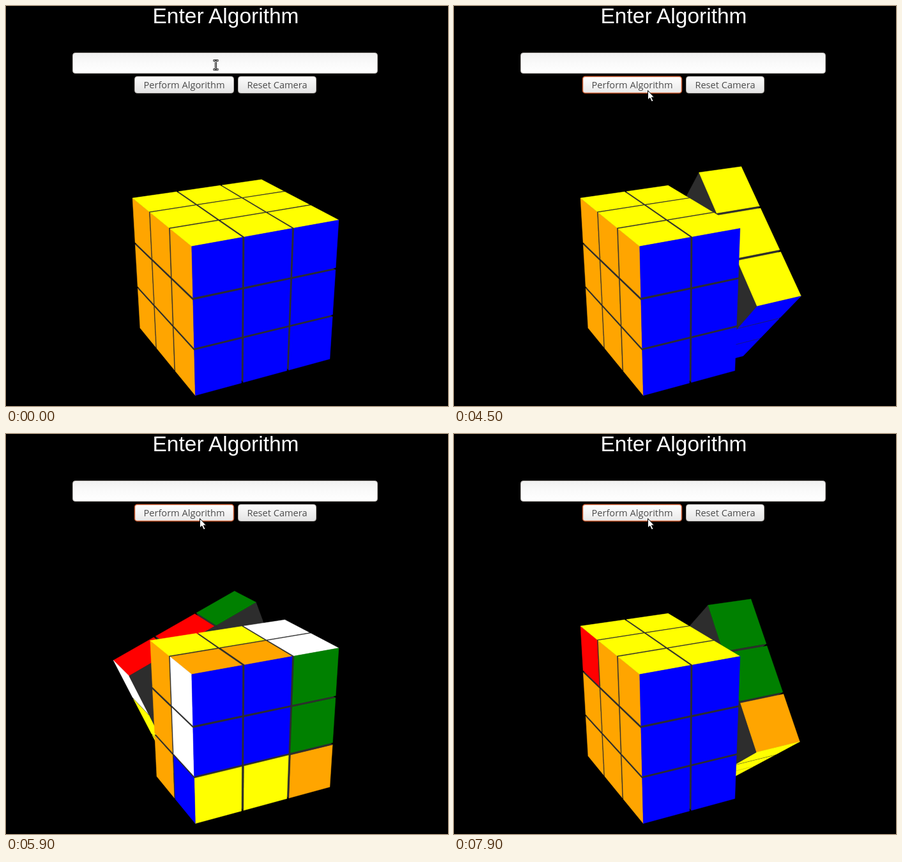
These frames come from a looping animation (692x627 px, 8000 ms). An HTML page with a canvas:

```html
<!DOCTYPE html>
<html lang="en">
<head>
<meta charset="utf-8">
<title>Enter Algorithm</title>
<style>
  html, body { margin: 0; width: 100%; height: 100%; overflow: hidden; background: #000; }
  canvas, svg { position: absolute; left: 0; top: 0; width: 692px; height: 627px; }
  .title { font: 33.5px "Liberation Sans", Arial, sans-serif; fill: #fff; text-anchor: middle; }
  .label { font: 14.6px "Open Sans", "Noto Sans", sans-serif; fill: #4c4c4c; text-anchor: middle; }
  .entry { font: 19.7px "Open Sans", "Noto Sans", sans-serif; fill: #3c3c3c; }
  .box { stroke: #b4b0ac; }
  .box.focus { stroke: #e0875f; }
  .button.focus { stroke: #c8582c; stroke-width: 1.5; }
  .button.hover { fill: url(#lit); }
</style>
</head>
<body>
<canvas id="stage" width="692" height="627"></canvas>
<svg viewBox="0 0 692 627">
  <defs>
    <linearGradient id="field" x2="0" y2="1">
      <stop stop-color="#f1f1f1"/><stop offset=".5" stop-color="#fafafa"/><stop offset="1" stop-color="#fff"/>
    </linearGradient>
    <linearGradient id="plain" x2="0" y2="1">
      <stop stop-color="#fcfcfc"/><stop offset="1" stop-color="#e4e4e4"/>
    </linearGradient>
    <linearGradient id="lit" x2="0" y2="1">
      <stop stop-color="#fff"/><stop offset="1" stop-color="#e9e9e9"/>
    </linearGradient>
  </defs>
  <text class="title" x="344" y="27">Enter Algorithm</text>
  <rect id="input" class="box" x="104.5" y="73.5" width="477" height="32" rx="4" fill="url(#field)"/>
  <text id="entry" class="entry" x="111" y="97">R' F R' B2 R F' R' B2 R2</text>
  <rect id="caret" y="78" width="1" height="23" fill="#222"/>
  <rect id="perform" class="box button" x="201.5" y="110.5" width="155" height="26" rx="4" fill="url(#plain)"/>
  <rect class="box button" x="363.5" y="110.5" width="122" height="26" rx="4" fill="url(#plain)"/>
  <text class="label" x="279" y="129">Perform Algorithm</text>
  <text class="label" x="424.5" y="129">Reset Camera</text>
  <g id="beam" fill="none">
    <path d="M324.5 85.5h3l1 1 1-1h3M328.5 86v13M324.5 99.5h3l1-1 1 1h3" stroke="#000" stroke-width="3"/>
    <path d="M325 85.5h2.500l1 1 1-1h2.500M328.500 86v13M325 99.500h2.500l1-1 1 1h2.500" stroke="#fff"/>
  </g>
  <path id="arrow" d="M.5.500v14.500l3.200-3 2.800 6 2.500-1.200-2.700-5.600h4.200z" fill="#fff" stroke="#000"/>
</svg>
<script>
const LOOP = 8000;
const DARK = '#2d2d2d';
const COLORS = [['#ffa500', '#f00'], ['#fff', '#ff0'], ['#008000', '#00f']]; // per axis: negative, positive side
const GAP = 0.03, SIZE = (2 - 2 * GAP) / 3, PITCH = SIZE + GAP;
const CAMERA = [-4, 4, 8];

// axis, layer, quarter turns
const MOVES = [
  [0, 1, 1], [2, 1, -1], [0, 1, 1], [2, -1, 2], [0, 1, -1],
  [2, 1, 1], [0, 1, 1], [2, -1, 2], [0, 1, -2]
];
// time in ms, number of moves done
const PACE = [
  [4300, 0], [5400, 2.444], [5900, 3.622], [6700, 5.622],
  [7300, 7.089], [7500, 7.578], [7700, 7.885], [7900, 8.222]
];

const $ = id => document.getElementById(id);
const ctx = $('stage').getContext('2d');
ctx.lineJoin = 'round';
ctx.lineWidth = 0.5;

const dot = (a, b) => a[0] * b[0] + a[1] * b[1] + a[2] * b[2];
const add = (a, b, k) => a.map((x, i) => x + b[i] * k);

function turn(v, axis, angle) {
  const i = (axis + 1) % 3, j = (axis + 2) % 3;
  const c = Math.cos(angle), s = Math.sin(angle);
  const out = [...v];
  out[i] = v[i] * c - v[j] * s;
  out[j] = v[i] * s + v[j] * c;
  return out;
}

function project([x, y, z]) {
  const k = 1127.7 / (4 * Math.sqrt(6) + (x - y - 2 * z) / Math.sqrt(6));
  return [
    352.5 + k * (2 * x + z) / Math.sqrt(5),
    427.2 - k * (x + 5 * y - 2 * z) / Math.sqrt(30)
  ];
}

function makeCubies() {
  const list = [];
  for (let n = 0; n < 27; n++) {
    const home = [n % 3 - 1, Math.floor(n / 3) % 3 - 1, Math.floor(n / 9) - 1];
    list.push({ home, pos: home, axes: [[1, 0, 0], [0, 1, 0], [0, 0, 1]] });
  }
  return list;
}

function turnLayer(cubies, [axis, layer, quarters], part) {
  const angle = quarters * part * Math.PI / 2;
  const moving = cubies.filter(c => Math.round(c.pos[axis]) === layer);
  for (const c of moving) {
    c.pos = turn(c.pos, axis, angle);
    c.axes = c.axes.map(a => turn(a, axis, angle));
  }
  return moving;
}

function drawFace(center, u, v, color) {
  ctx.beginPath();
  for (const [a, b] of [[-1, -1], [1, -1], [1, 1], [-1, 1]]) {
    ctx.lineTo(...project(add(add(center, u, a * SIZE / 2), v, b * SIZE / 2)));
  }
  ctx.closePath();
  ctx.fillStyle = ctx.strokeStyle = color;
  ctx.fill();
  ctx.stroke();
}

function drawCubie({ home, pos, axes }) {
  const center = pos.map(x => x * PITCH);
  for (let k = 0; k < 3; k++) {
    for (const side of [-1, 1]) {
      const mid = add(center, axes[k], side * SIZE / 2);
      if (side * dot(axes[k], add(CAMERA, mid, -1)) <= 0) continue;
      const color = home[k] === side ? COLORS[k][(side + 1) / 2] : DARK;
      drawFace(mid, axes[(k + 1) % 3], axes[(k + 2) % 3], color);
    }
  }
}

function drawGroup(cubies) {
  const distance = c => {
    const d = add(CAMERA, c.pos, -PITCH);
    return dot(d, d);
  };
  cubies.sort((a, b) => distance(b) - distance(a)).forEach(drawCubie);
}

function movesDone(t) {
  if (t <= PACE[0][0]) return 0;
  const n = PACE.findIndex(p => t <= p[0]);
  if (n < 0) return PACE[PACE.length - 1][1];
  const [t0, p0] = PACE[n - 1], [t1, p1] = PACE[n];
  return p0 + (p1 - p0) * (t - t0) / (t1 - t0);
}

function drawCube(t) {
  const done = movesDone(t), current = Math.floor(done);
  const cubies = makeCubies();
  MOVES.slice(0, current).forEach(m => turnLayer(cubies, m, 1));
  const move = MOVES[current];
  const moving = turnLayer(cubies, move, done - current);
  const groups = [cubies.filter(c => !moving.includes(c)), moving];
  // the moving layer is in front only when the camera is on its side
  if (CAMERA[move[0]] * move[1] < 0) groups.reverse();
  ctx.clearRect(0, 0, 692, 627);
  groups.forEach(drawGroup);
}

function drawPanel(t) {
  const within = (from, to) => t >= from && t < to;
  const show = (id, on) => $(id).setAttribute('visibility', on ? 'visible' : 'hidden');
  show('entry', within(800, 4300));
  show('caret', within(400, 1600) || within(2800, 4100));
  $('caret').setAttribute('x', t < 800 ? 111 : 312);
  show('beam', t < 2800);
  show('arrow', t >= 2800);
  $('arrow').setAttribute('transform', t < 2900 ? 'translate(305 129)' : 'translate(303 132)');
  $('input').classList.toggle('focus', within(400, 4300));
  $('perform').classList.toggle('hover', t >= 2800);
  $('perform').classList.toggle('focus', t >= 4300);
}

// the picture holds between ticks, which grow longer near the end
function tick(t) {
  return t < 7100 ? Math.floor(t / 100) * 100 : 7100 + Math.floor((t - 7100) / 200) * 200;
}

const start = performance.now();
let last = -1;
function frame() {
  const t = tick((performance.now() - start) % LOOP);
  if (t !== last) {
    drawCube(t);
    drawPanel(t);
    last = t;
  }
  requestAnimationFrame(frame);
}
frame();
</script>
</body>
</html>
```
